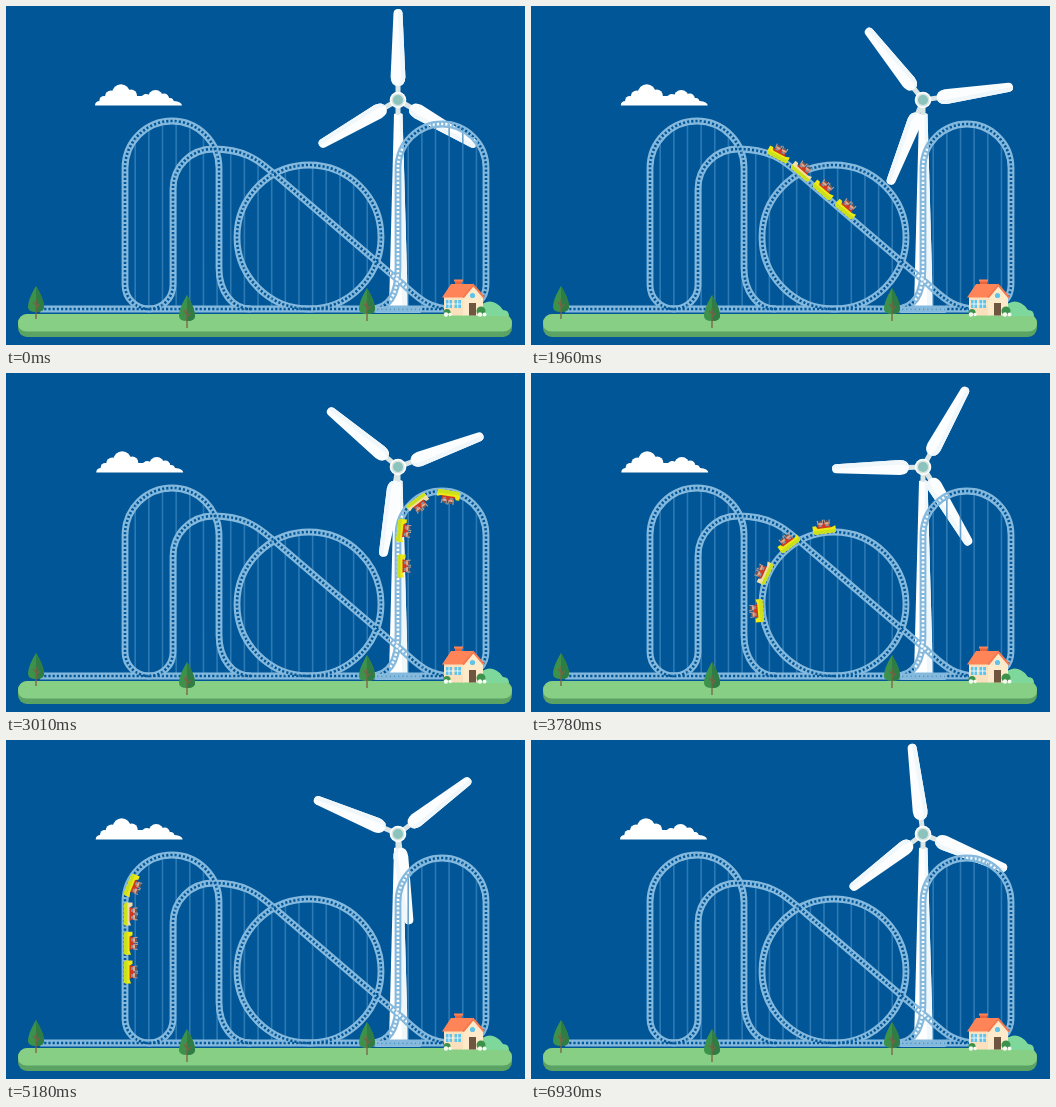
Write an HTML page that moves like this. It is 519 by 339 pixels and loops after 7 s.

```html
<!DOCTYPE html>
<html lang="en">
<head>
<meta charset="utf-8">
<title>Coaster and windmill</title>
<style>
  html, body { margin: 0; width: 100%; height: 100%; overflow: hidden; background: #005697; }
  svg { display: block; width: 100%; height: 100%; }
</style>
</head>
<body>
<svg viewBox="0 0 519 339">
  <defs>
    <clipPath id="inside">
      <path d="M119 303V162A47 47 0 0 1 213 162V303Z"/>
      <path d="M167 303V183A40 40 0 0 1 207 143C238 143 252 154 266 166L300 195V303Z"/>
      <circle cx="303" cy="231" r="72"/>
      <path d="M392 303V162A44 44 0 0 1 480 162V303Z"/>
    </clipPath>
    <clipPath id="entry"><rect x="34" width="485" height="339"/></clipPath>
    <mask id="ties" maskUnits="userSpaceOnUse" x="0" y="0" width="519" height="339">
      <g id="railMask" fill="none"></g>
    </mask>
    <g id="blade">
      <path d="M-2.5 -6V-18H2.5V-6Z" fill="#dbe6e4"/>
      <path d="M-4.5 -87Q-4 -91 0 -91T4.5 -87L7.4 -23Q7 -14 0 -14T-7.4 -23Z" fill="#fbfdfe"/>
      <path d="M0 -91Q4 -91 4.5 -87L7.4 -23Q7 -14 0 -14Q3 -17 3 -24Z" fill="#f0f7fa"/>
    </g>
    <g id="tree">
      <path d="M0 -17C3 -12 8 -3 8 4Q8 9 0 9T-8 4C-8 -3 -3 -12 0 -17Z" fill="#3c924b"/>
      <path d="M0 -17C3 -12 8 -3 8 4Q8 9 0 9Z" fill="#2f7d45"/>
      <path d="M0 -4V16M0 5L3.5 1M0 2L-3 -1" fill="none" stroke="#7d6044" stroke-width="1.3"/>
    </g>
    <g id="riders">
      <path d="M-6 -8.5Q-6 -9.5 -5 -9.5H5L7 -4H-7Z" fill="#cf3a24"/>
      <path d="M-5.5 -8L-6 -12.5M-1.5 -8L-.6 -13M1.8 -8L.8 -13M5.5 -8L6 -12.5" stroke="#b49a92" stroke-width="1.2"/>
      <g fill="#e5a98a"><circle cx="-3.2" cy="-9.6" r="2"/><circle cx="3.2" cy="-9.6" r="2"/></g>
      <path d="M-5.2 -10A2 2 0 0 1 -1.2 -10ZM1.2 -10A2 2 0 0 1 5.2 -10Z" fill="#76554c"/>
      <path d="M-5 -7H-2M2 -7H5" stroke="#7f9bb0" stroke-width="1.6"/>
    </g>
  </defs>

  <g id="cloud" fill="#fff">
    <path d="M89 99.5Q89 95 94 95L105 90H160L168 95Q175.5 95.5 176 99.5Z"/>
    <circle cx="98" cy="94.5" r="4.6"/><circle cx="105" cy="90.500" r="6"/>
    <circle cx="115" cy="87" r="8.8"/><circle cx="125" cy="89.5" r="6"/>
    <circle cx="140" cy="92.5" r="4.5"/><circle cx="149.5" cy="91.5" r="7.5"/>
    <circle cx="158" cy="92.5" r="5"/><circle cx="164" cy="95.5" r="3.5"/>
  </g>

  <rect x="12" y="308" width="494" height="23" rx="9" fill="#5ba265"/>
  <path d="M12 317A9 9 0 0 1 21 308H497A9 9 0 0 1 506 317Q506 325.5 497 325.5H21Q12 325.5 12 317Z" fill="#87cf85"/>

  <path d="M388 108Q392 106 396.5 108L402 303H383Z" fill="#fff"/>
  <path d="M393.5 107L396.5 108L402 303H396Z" fill="#f0f7fa"/>
  <rect x="389.5" y="96" width="5" height="13" rx="2" fill="#dbe6e4"/>
  <g transform="translate(392 94)">
    <g id="rotor"></g>
    <circle r="8.3" fill="#fff"/><circle r="6.6" fill="#d7e5e0"/><circle r="5" fill="#8cc3bd"/>
  </g>

  <path id="posts" clip-path="url(#inside)" stroke="#3d86bd" stroke-width="1.6" opacity=".75"/>
  <rect x="369" y="300.5" width="46" height="6.5" rx="1" fill="#8fbfdd"/>
  <path d="M371 303.500H414" stroke="#4f93c0" stroke-width="2" stroke-dasharray="2.2 2"/>
  <rect width="519" height="339" fill="#84b9dd" mask="url(#ties)"/>

  <g clip-path="url(#entry)"><g id="train"></g></g>

  <use href="#tree" x="30" y="297"/>
  <use href="#tree" x="181" y="306"/>
  <use href="#tree" x="361" y="299"/>

  <path d="M468 310A16 18.5 0 0 1 497 304Q503 304 503 310Z" fill="#7ed79b"/>
  <g id="house">
    <rect x="449" y="274" width="7" height="7" fill="#e8653f"/>
    <rect x="448" y="273.5" width="9" height="2" fill="#ff8358"/>
    <path d="M438 289H458V309.5H438Z" fill="#fbe0bd"/>
    <path d="M457 309.5V291L467 279L477 291V309.5Z" fill="#fdeacb"/>
    <path d="M445 278H468L458 291.5H436Z" fill="#ff8559"/>
    <path d="M457 291.5L467.3 279L478 291.5" fill="none" stroke="#f47a50" stroke-width="2"/>
    <path d="M440 294H446V302H440ZM448.5 294H455V302H448.5Z" fill="#5fc3ea"/>
    <path d="M443 294V302M451.7 294V302M439.5 298H455.5" stroke="#fff" stroke-width=".8"/>
    <circle cx="466.5" cy="289.5" r="2.6" fill="#5fc3ea"/>
    <rect x="463" y="297" width="7" height="12.5" fill="#6f5640"/>
    <g fill="#3c924b"><circle cx="441" cy="306.5" r="3.6"/><circle cx="475" cy="305" r="4.5"/></g>
    <g fill="#f4fbf0"><circle cx="440" cy="308.5" r="2.2"/><circle cx="444" cy="308.5" r="1.8"/><circle cx="474" cy="308.5" r="2.2"/><circle cx="478.5" cy="308.5" r="2"/></g>
  </g>
</svg>

<script>
const NS = 'http://www.w3.org/2000/svg';
const LOOP = 7000, STEP = 70, LAG = 70, CARS = 4;
const $ = id => document.getElementById(id);

function add(parent, tag, attrs) {
  const el = document.createElementNS(NS, tag);
  for (const k in attrs) el.setAttribute(k, attrs[k]);
  return parent.appendChild(el);
}

// Track sections, in riding order
const hills = 'A24 24 0 0 0 167 279V183A40 40 0 0 1 207 143C238 143 252 154 266 166' +
  'L392 274C410 289 420 303 446 303H456A24 24 0 0 0 480 279V162A44 44 0 0 0 392 162' +
  'V262C392 284 386 303 364 303';
const ring = 'A72 72 0 0 1 303 159A72 72 0 0 1 303 303';
const tower = 'C226 303 213 285 213 262V162A47 47 0 0 0 119 162V279A24 24 0 0 0 143 303';

const rails = ['M34 303H456', 'M143 303' + hills, 'M303 303' + ring, 'M245 303' + tower];
for (const d of rails) add($('railMask'), 'path', { d, stroke: '#fff', 'stroke-width': 6.8 });
for (const d of rails) add($('railMask'), 'path', { d, stroke: '#000', 'stroke-width': 2.6, 'stroke-dasharray': '2.2 2' });

let posts = '';
for (let x = 129.2; x < 480; x += 13.65) posts += `M${x} 100V303`;
$('posts').setAttribute('d', posts);

for (let a = 0; a < 360; a += 120) add($('rotor'), 'use', { href: '#blade', transform: `rotate(${a})` });

const ride = document.createElementNS(NS, 'path');
ride.setAttribute('d', `M-4 303H143${hills}H303${ring}H245${tower}H470`);
const length = ride.getTotalLength();

function makeCar(i) {
  const car = add($('train'), 'g', {});
  add(car, 'use', { href: '#riders' });
  add(car, 'path', { d: 'M-11.5 -7.5H-8L-6.5 -4.5H7L11.5 -6V-1Q11.5 1 9.5 1H-9Q-11.5 1 -11.5 -2Z', fill: i === 2 ? '#f3dfa6' : '#f0e812' });
  add(car, 'path', { d: 'M-11.5 -2.5H11.5V-1Q11.5 1 9.5 1H-9Q-11.5 1 -11.5 -2Z', fill: '#cbe01c' });
  return car;
}
const cars = Array.from({ length: CARS }, (_, i) => makeCar(i));

const ease = u => u * u * (3 - 2 * u);

function placeCar(car, t) {
  const s = length * ease(Math.max(0, t) / LOOP);
  const p = ride.getPointAtLength(s);
  const a = ride.getPointAtLength(Math.max(0, s - 4));
  const b = ride.getPointAtLength(Math.min(length, s + 4));
  const angle = Math.atan2(b.y - a.y, b.x - a.x) * 180 / Math.PI;
  car.setAttribute('transform', `translate(${p.x} ${p.y}) rotate(${angle})`);
}

function draw(t) {
  $('rotor').setAttribute('transform', `rotate(${720 * t / LOOP})`);
  $('cloud').setAttribute('transform', `translate(${0.65 * (1 - Math.cos(2 * Math.PI * t / LOOP))} 0)`);
  cars.forEach((car, i) => placeCar(car, t - i * LAG));
}

const start = performance.now();
function tick() {
  const t = (performance.now() - start) % LOOP;
  draw(t - t % STEP);
  requestAnimationFrame(tick);
}
tick();
</script>
</body>
</html>
```
